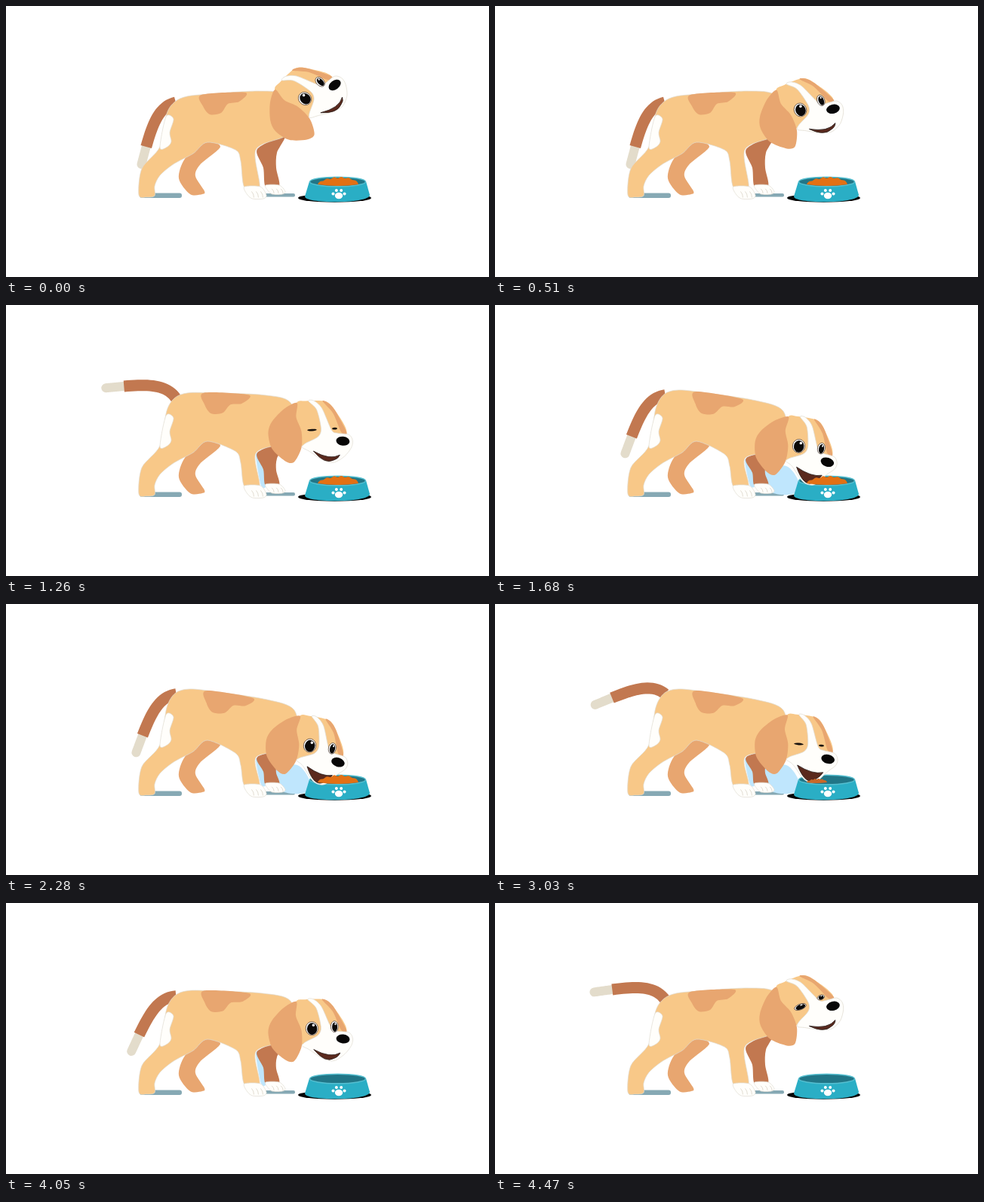
An HTML page with a canvas for the animation above (4.5 s loop, 640x360 px).

```html
<!DOCTYPE html>
<html lang="en">
<head>
<meta charset="utf-8">
<title>Puppy at the bowl</title>
<style>
html, body { margin: 0; width: 100%; height: 100%; overflow: hidden; background: #fff; }
canvas { display: block; }
</style>
</head>
<body>
<canvas id="stage" width="640" height="360"></canvas>
<script>
const ctx = document.getElementById('stage').getContext('2d');
const LOOP = 4500, STEP = 30, WAG = 1620, RAD = Math.PI / 180;
const TAN = '#f8c888', EAR = '#e8a670', BROWN = '#c27850', WHITE = '#fffefb';
const SKY = '#bfe6fd', SHADE = '#86a9b4', EDGE = '#e0dcd2';

const clamp = v => Math.max(0, Math.min(1, v));
const smooth = (a, b, t) => { const k = clamp((t - a) / (b - a)); return k * k * (3 - 2 * k); };

// Leaning tips the trunk over the hips; feet and buttocks stay put.
const sway = lean => ([x, y]) => {
  const arm = x - 272;
  const upper = clamp((160 - y) / 40);
  const grip = arm < 0 ? upper : clamp((225 - y) / 20);
  return [x + 10 * lean * upper * clamp((x - 220) / 60), y + 0.22 * arm * grip * lean];
};

function line(color, width) {
  ctx.strokeStyle = color;
  ctx.lineWidth = width;
  ctx.stroke();
}

// Closed soft outline through a few key points.
function shape(points, color, edge) {
  const n = points.length;
  const at = i => points[(i + n) % n];
  ctx.beginPath();
  ctx.moveTo(...points[0]);
  for (let i = 0; i < n; i++) {
    const [a, b, c, d] = [at(i - 1), at(i), at(i + 1), at(i + 2)];
    ctx.bezierCurveTo(b[0] + (c[0] - a[0]) / 7, b[1] + (c[1] - a[1]) / 7,
      c[0] - (d[0] - b[0]) / 7, c[1] - (d[1] - b[1]) / 7, c[0], c[1]);
  }
  ctx.fillStyle = color;
  ctx.fill();
  if (edge) line(edge, 0.7);
}

function oval(x, y, rx, ry, color, turn = 0) {
  ctx.beginPath();
  ctx.ellipse(x, y, rx, ry, turn, 0, Math.PI * 2);
  ctx.fillStyle = color;
  ctx.fill();
}

const BODY = [
  [372, 119], [335, 113], [270, 117], [240, 120], [224, 127], [213, 143], [204, 187], [180, 216],
  [176, 251], [186, 254], [197, 252], [197, 239], [204, 225], [222, 210], [248, 196], [267, 181],
  [304, 191], [311, 206], [316, 241], [336, 241], [331, 191], [368, 174], [388, 160]
];
const SPOT = [[259, 118], [261, 133], [270, 144], [285, 142], [294, 130], [309, 127], [317, 115]];
const RUMP = [[212, 147], [222, 150], [217, 168], [219, 180], [214, 187], [204, 188]];
const HIND = [[263, 180], [284, 187], [257, 211], [251, 226], [263, 246], [260, 250], [244, 250],
  [229, 229], [237, 203]];
const FORE = [[333, 190], [369, 173], [359, 195], [358, 215], [362, 239], [344, 240], [341, 215]];

// Two arms steer the curve, the third ends it; all swing by the same angle.
function drawTail(t, lean) {
  const phase = t % WAG;
  const wag = smooth(700, 1240, phase) - smooth(1290, 1620, phase);
  const arm = (reach, angle) => {
    const a = (angle + 67 * wag) * RAD;
    return [reach * Math.cos(a), reach * Math.sin(a)];
  };
  const [c1, c2, end] = [arm(29, 167), arm(55, 129), arm(101, 118)];
  const along = s => [0, 1].map(i =>
    3 * s * (1 - s) ** 2 * c1[i] + 3 * s * s * (1 - s) * c2[i] + s ** 3 * end[i]);
  const part = (from, to, color, width, cap) => {
    ctx.beginPath();
    for (let i = 0; i <= 20; i++) ctx.lineTo(...along(from + (to - from) * i / 20));
    ctx.lineCap = cap;
    line(color, width);
  };
  ctx.save();
  ctx.translate(...sway(lean)([225, 128]));
  ctx.rotate(0.096 * lean);
  part(0.75, 0.95, '#e3dccb', 12, 'round');
  part(0, 0.77, BROWN, 15, 'butt');
  ctx.restore();
}

function drawPaw(x, y, w, h) {
  shape([[x, y], [x + w, y], [x + w + 8, y + h * 0.7], [x + w + 4, y + h], [x + w * 0.5, y + h],
    [x + 3, y + h * 0.6]], WHITE, EDGE);
  ctx.beginPath();
  for (let i = 0; i < 3; i++) {
    const toe = x + w * 0.45 + i * 6;
    ctx.moveTo(toe, y + h * 0.4);
    ctx.quadraticCurveTo(toe + 3, y + h * 0.6, toe + 3, y + h * 0.9);
  }
  line('#d5cec2', 0.7);
}

function drawGround(lean) {
  ctx.beginPath();
  ctx.roundRect(177, 248.5, 56, 6.5, 3);
  ctx.roundRect(342, 249, 41, 4.5, 2);
  ctx.fillStyle = SHADE;
  ctx.fill();
  if (lean < 0.2) return;
  shape([[331, 194], [338, 194], [345, 238], [338, 240]].map(sway(lean)), SKY);
  if (lean > 0.85) shape([[355, 218], [386, 214], [402, 234], [396, 251], [365, 248]], SKY);
}

function drawBowl() {
  oval(435.5, 255, 48.5, 5.8, '#050505');
  ctx.beginPath();
  ctx.moveTo(402, 233);
  ctx.lineTo(396, 253);
  ctx.bezierCurveTo(396, 263, 482, 263, 482, 251);
  ctx.lineTo(477, 233);
  ctx.fillStyle = '#2aaec5';
  ctx.fill();
  oval(439.5, 233.5, 37, 6.3, '#217687');
  line('#55bfd0', 1.4);
  oval(441, 252, 5.2, 4.2, '#fff');
  for (let i = 0; i < 4; i++) {
    const a = (200 + i * 46.7) * RAD;
    oval(441 + 8 * Math.cos(a), 252 + 7.6 * Math.sin(a), 2, 2, '#fff');
  }
}

function drawFood(t) {
  const level = 1 - 0.5 * clamp((t - 2350) / 680) - 0.5 * clamp((t - 3030) / 400);
  if (level < 0.05) return;
  ctx.save();
  ctx.translate(413, 237);
  ctx.scale(level, level);
  ctx.beginPath();
  for (let x = 0; x <= 54; x++) {
    const heap = Math.sqrt(Math.sin(Math.PI * x / 54));
    ctx.lineTo(x, -heap * (8 + x / 24 + Math.sin(x * 0.65)));
  }
  ctx.quadraticCurveTo(27, 4, 0, 0);
  ctx.fillStyle = level < 0.6 ? '#c9692a' : '#e27014';
  ctx.fill();
  ctx.restore();
}

function drawEye(x, y, rx, ry, open) {
  if (open < 0.15) return oval(x, y, rx * 0.9, 1.4, '#15100d', -0.05);
  oval(x, y, rx + 1.2, (ry + 1.2) * open, '#fff');
  line('#4a3a30', 0.7);
  oval(x + 0.3, y + 0.5 * open, rx - 0.3, ry * open, '#0b0909');
  oval(x + rx * 0.3, y - ry * 0.55 * open, rx * 0.26, ry * 0.23 * open, '#fff');
}

function drawMouth(gape) {
  ctx.beginPath();
  ctx.moveTo(2, 28);
  ctx.quadraticCurveTo(17, 44 + 11 * gape, 29, 39 + 4 * gape);
  ctx.quadraticCurveTo(35, 38, 37, 33);
  ctx.quadraticCurveTo(24, 41 - 3 * gape, 2, 28);
  ctx.fillStyle = '#5a291d';
  ctx.fill();
  line('#2d201d', 0.8);
}

function drawHead(t, down) {
  const lift = 1 - smooth(0, 480, t);
  const between = down * (1 - down);
  const chew = down * Math.cos((t - 2280) / 500 * Math.PI * 2);
  const gape = clamp((down - 0.5) * 2);
  const phase = t % WAG;
  const open = 1 - smooth(1195, 1258, phase) + smooth(1425, 1490, phase);

  ctx.save();
  ctx.translate(404.5 - 2 * down + 9 * between - 8.5 * lift, 138 + 49 * down - 8 * between + chew - 15 * lift);
  ctx.rotate((-21 + 30.5 * down + 8 * between + 1.7 * chew - 23 * lift) * RAD);

  shape([[-21, -35], [-8, -38.5], [18, -38], [30, -27], [46, 2], [30, 20], [4, 16], [-12, 22],
    [-24, 0]], TAN);
  shape([[14, -38], [20, -37], [30, -27], [46, 3], [39, 3], [28, -22]], EAR);
  shape([[-5, -38.5], [2, -39], [13, -29], [26, 0], [34, 4], [49, 6], [54, 14], [52, 24 - 2 * gape],
    [43, 36 - 5 * gape], [29, 42 + 5 * gape], [14, 38 + 8 * gape], [-4, 28], [-13, 23], [-9, 18],
    [8, 9], [12, -2], [6, -27]], WHITE, EDGE);
  shape([[-20, -36], [-37, -28], [-53, -11], [-58, 4], [-53, 25], [-36, 41], [-24, 43], [-14, 24],
    [-14, 2], [-21, -17]], EAR);

  drawMouth(gape);
  drawEye(0, 0, 7, 7.8, open);
  drawEye(30, -2, 3.8, 6.2, open);
  oval(41, 14.5, 9, 6, '#080707', 0.12);
  ctx.restore();
}

function drawDog(t, down, lean) {
  const lay = (points, color, edge) => shape(points.map(sway(lean)), color, edge);
  drawTail(t, lean);
  shape(HIND, EAR);
  lay(FORE, BROWN);
  drawPaw(344, 238, 18, 12);
  lay(BODY, TAN, EDGE);
  lay(SPOT, EAR);
  shape(RUMP, WHITE, EDGE);
  drawPaw(316, 240, 21, 16);
  drawHead(t, down);
}

function draw(t) {
  const down = smooth(850, 1573, t) - smooth(3780, 4440, t);
  const lean = Math.max(0, down) ** 1.5;
  ctx.fillStyle = '#fff';
  ctx.fillRect(0, 0, 640, 360);
  drawGround(lean);
  drawBowl();
  drawDog(t, down, lean);
  drawFood(t);
}

function tick() {
  const t = performance.now() % LOOP;
  draw(Math.floor(t / STEP) * STEP);
  requestAnimationFrame(tick);
}
tick();
</script>
</body>
</html>
```
